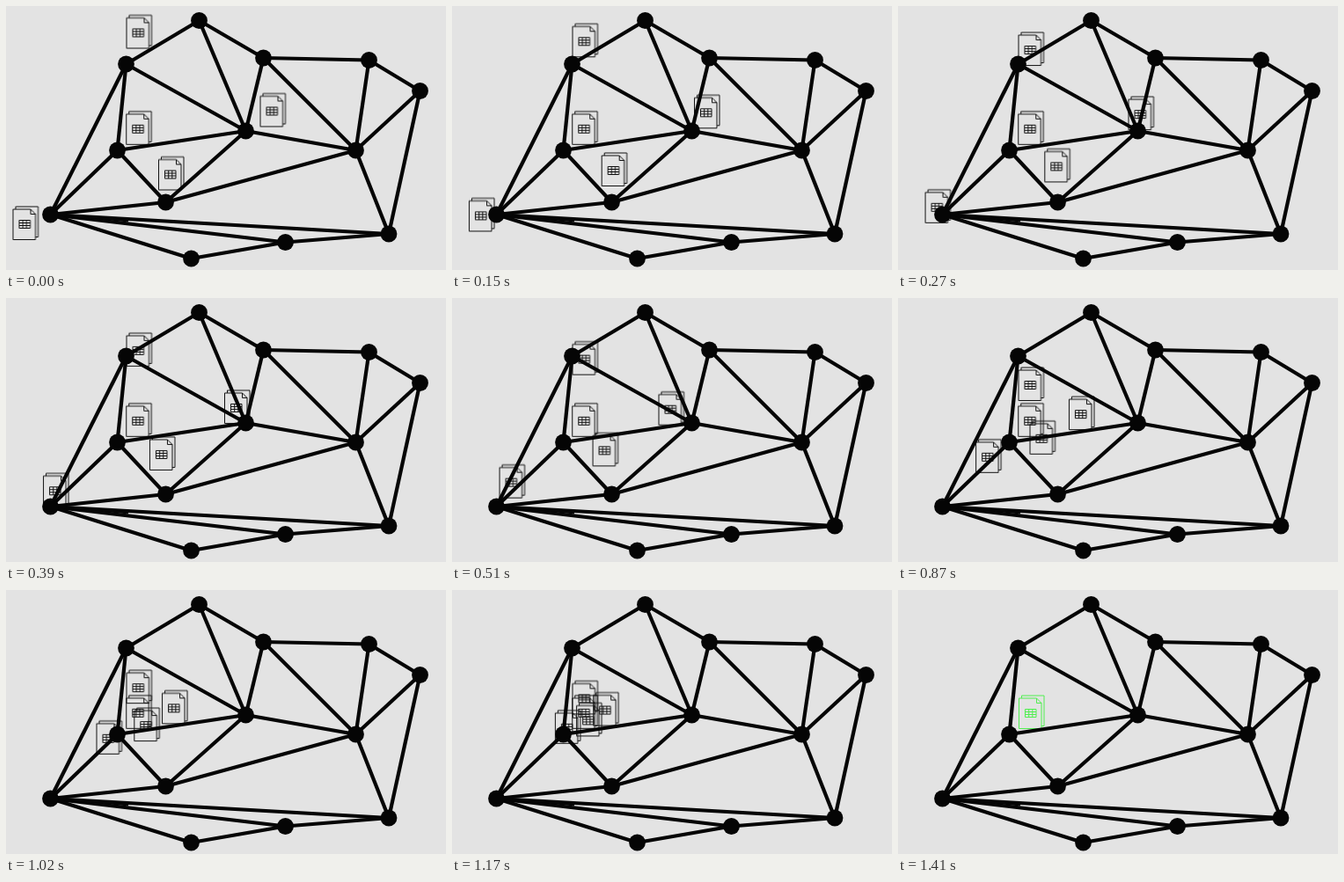
Write an HTML page that moves like this. It is 500 by 300 pixels and loops after 2.28 s.

```html
<!DOCTYPE html>
<html lang="en">
<head>
<meta charset="utf-8">
<title>Files meeting in a network</title>
<style>
  html, body { margin: 0; width: 100%; height: 100%; overflow: hidden; background: #e3e3e3; }
  svg { display: block; width: 500px; height: 300px; }
  .doc { fill: none; stroke: #111; stroke-width: 1; }
  #merged { stroke: #50ee50; opacity: 0; }
  #edges { stroke: #050505; stroke-width: 4.2; }
  #nodes, #wedge { fill: #050505; }
</style>
</head>
<body>
<svg viewBox="0 0 500 300">
  <defs>
    <g id="icon">
      <path d="M-13.5-17H6.5L12-11.5V17.5H-13.5ZM6.5-17V-11.5H12"/>
      <path d="M-10.5-17V-20H15V14.5H12"/>
      <path d="M-6.5-4.5H6V4.5H-6.5ZM-6.5-1.5H6M-6.5 1.5H6M-2.3-4.5V4.5M1.8-4.5V4.5"/>
    </g>
  </defs>
  <g id="docs"></g>
  <use id="merged" class="doc" href="#icon" x="151" y="140"/>
  <g id="edges"></g>
  <path id="wedge" d="M50 237L139 242V245.5Z"/>
  <g id="nodes"></g>
</svg>
<script>
const LOOP = 2280, START = 30, ARRIVE = 1380, MERGE = 1410, STEPS = 45;

const nodes = {
  A: [219.5, 16.5], B: [136.5, 66], C: [292.5, 59], D: [412.5, 61.5], E: [470.5, 96.5],
  F: [272.5, 142], G: [397.5, 164], H: [126.5, 164], I: [181.5, 223], J: [50.5, 237],
  K: [210.5, 287], L: [317.5, 268.5], M: [435, 259]
};
const edges = 'JB JH JI JL JM JK BA BH BF AC AF CF CD CG DE DG EG EM FH FI FG GI GM HI KL LM';

// Each file: start point, end point
const files = [
  [150.5, 30.5, 150.5, 140.5],
  [150.2, 139.8, 150.2, 139.8],
  [302.5, 119.5, 150.5, 139.7],
  [187, 191.5, 149.2, 140.5],
  [21.5, 248, 151, 140]
];

function add(parent, tag, attrs) {
  const el = document.createElementNS('http://www.w3.org/2000/svg', tag);
  for (const key in attrs) el.setAttribute(key, attrs[key]);
  return document.getElementById(parent).appendChild(el);
}

function loop(el, frames) {
  el.animate(frames, { duration: LOOP, iterations: Infinity });
}

function fade(el, from, to) {
  loop(el, [
    { opacity: from, easing: 'steps(1, end)' },
    { opacity: to, offset: MERGE / LOOP },
    { opacity: to }
  ]);
}

for (const [a, b] of edges.split(' ')) {
  const [x1, y1] = nodes[a], [x2, y2] = nodes[b];
  add('edges', 'line', { x1, y1, x2, y2 });
}
for (const [cx, cy] of Object.values(nodes)) add('nodes', 'circle', { cx, cy, r: 9.4 });

for (const [x0, y0, x1, y1] of files) {
  const doc = add('docs', 'use', { href: '#icon', class: 'doc' });
  const from = `translate(${x0}px, ${y0}px)`, to = `translate(${x1}px, ${y1}px)`;
  loop(doc, [
    { transform: from },
    { transform: from, offset: START / LOOP, easing: `steps(${STEPS}, end)` },
    { transform: to, offset: ARRIVE / LOOP },
    { transform: to }
  ]);
}
fade(document.getElementById('docs'), 1, 0);
fade(document.getElementById('merged'), 0, 1);
</script>
</body>
</html>
```
